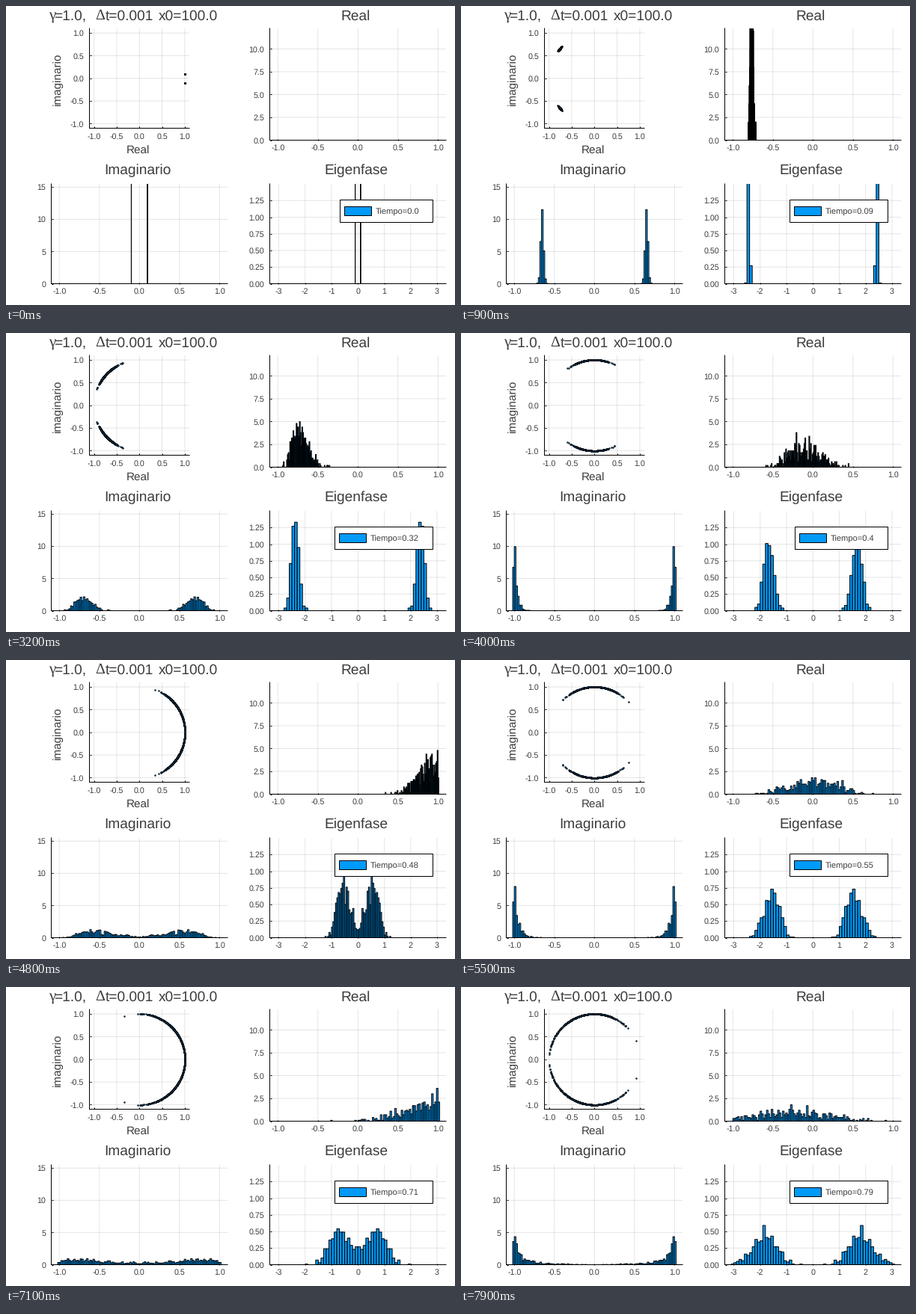
Recreate the animation shown at these times as a matplotlib script. Size 600 px wide and 400 px high, loop 8 s.

```python
import numpy as np
import matplotlib.pyplot as plt
from matplotlib.animation import FuncAnimation
from matplotlib.collections import PolyCollection
from matplotlib.patches import Rectangle

W, H, DPI = 600, 400, 100
PX = 72 / DPI  # points per pixel
BLUE, INK = "#009af9", "#3c3c3c"
FRAMES, STEPS = 80, 10
GAMMA, DT, X0 = 1.0, 0.001, 100.0
PAIRS, RADIUS = 500, 1.0035

plt.rcParams.update({
    "font.family": "Liberation Sans",
    "text.hinting": "none",
    "axes.linewidth": PX,
    "axes.axisbelow": True,
})


def simulate():
    """Damped noisy motion; the accumulated path is the eigenphase."""
    rng = np.random.default_rng(12)
    x = np.full(PAIRS, X0)
    phase = np.zeros(PAIRS)
    rows = []
    for step in range(FRAMES * STEPS):
        phase = phase + np.arcsin(x * DT)
        if step % STEPS == 0:
            rows.append(phase)
        x = x - GAMMA * x * DT + np.sqrt(2 * DT) * rng.normal(size=PAIRS)
    return rows


def bin_width(span, bins):
    raw = span / bins
    base = 10.0 ** np.floor(np.log10(raw))
    ratio = raw / base
    for limit, nice in ((1.1, 1), (2.2, 2), (5.5, 5)):
        if ratio <= limit:
            return nice * base
    return 10 * base


def bars(values, bins):
    lo, hi = values.min(), values.max()
    if hi - lo < 1e-9:
        return []
    w = bin_width(hi - lo, bins)
    first, last = np.floor(lo / w), np.floor(hi / w)
    edges = np.arange(first, last + 2) * w
    counts, _ = np.histogram(values, edges)
    heights = counts / (len(values) * w)
    return [[(a, 0), (a, h), (a + w, h), (a + w, 0)]
            for a, h in zip(edges, heights) if h > 0]


fig = plt.figure(figsize=(W / DPI, H / DPI), dpi=DPI, facecolor="white")

# Overlay in pixel coordinates, y downwards
stage = fig.add_axes([0, 0, 1, 1], zorder=5)
stage.set(xlim=(0, W), ylim=(H, 0))
stage.axis("off")


def label(x, y, text, size, ha="center", va="baseline", **kw):
    kw.setdefault("color", INK)
    return stage.text(x, y, text, fontsize=size * PX, ha=ha, va=va, **kw)


def box(x, y, w, h, fill):
    return stage.add_patch(Rectangle((x, y), w, h, fc=fill, ec="black",
                                     lw=PX, snap=False))


def panel(rect, xlim, ylim, xticks, yticks, xfmt, yfmt, xbase):
    left, top, right, bottom = rect
    ax = fig.add_axes([left / W, 1 - bottom / H,
                       (right - left) / W, (bottom - top) / H])
    ax.set(xlim=xlim, ylim=ylim, xticks=xticks, yticks=yticks)
    ax.spines[["top", "right"]].set_visible(False)
    for side in ("left", "bottom"):
        ax.spines[side].set_snap(False)
    ax.grid(color="black", alpha=0.1, lw=PX, snap=False)
    ax.tick_params(direction="in", length=2 * PX, width=PX,
                   labelbottom=False, labelleft=False)
    for v in xticks:
        x = left + (v - xlim[0]) / (xlim[1] - xlim[0]) * (right - left)
        label(x, xbase, format(v, xfmt), 10.6)
    for v in yticks:
        y = bottom - (v - ylim[0]) / (ylim[1] - ylim[0]) * (bottom - top)
        label(left - 7.2, y + 4, format(v, yfmt), 10.6, ha="right")
    return ax


def histogram(ax):
    coll = PolyCollection([], facecolors=BLUE, edgecolors="black",
                          linewidths=PX, snap=False)
    ax.add_collection(coll, autolim=False)
    return coll


unit = (-1.1, 1.1)
halves = [-1.0, -0.5, 0.0, 0.5, 1.0]

plane = panel((111.5, 30, 245, 163.5), unit, unit,
              halves, halves, ".1f", ".1f", 177.7)
real = histogram(panel((352.5, 30, 588, 179.5), unit, (0, 12.25), halves,
                       [0, 2.5, 5, 7.5, 10], ".1f", ".1f", 192.8))
imag = histogram(panel((60.5, 238, 296, 371.5), unit, (0, 15.5), halves,
                       [0, 5, 10, 15], ".1f", ".0f", 384.8))
angle = histogram(panel((352.5, 238, 588, 371.5), (-3.34, 3.34), (0, 1.5),
                        range(-3, 4), [0, 0.25, 0.5, 0.75, 1, 1.25],
                        "d", ".2f", 384.8))

dots, = plane.plot([], [], "o", ms=1.6 * PX, mfc=BLUE, mec="black",
                   mew=0.8 * PX)

# Titles and axis labels
TITLE = 19.2
label(57.5, 18.4, "γ", 21, ha="left", family="Liberation Serif")
label(64.5, 18.4, "=1.0,", TITLE, ha="left")
label(119.5, 18.4, "Δ", TITLE + 1, ha="left", family="Liberation Serif")
label(132.5, 18.4, "t=0.001", TITLE, ha="left")
label(204, 18.4, "x0=100.0", TITLE, ha="left")
label(467.5, 18.4, "Real", TITLE)
label(175.5, 225.5, "Imaginario", TITLE)
label(467.5, 225.5, "Eigenfase", TITLE)
label(176.5, 198, "Real", 15.2)
label(72.5, 98, "imaginario", 15.2, rotation=90, rotation_mode="anchor")

# Legend, anchored at its right edge
LEGEND_RIGHT = 570.5
frame_box = box(439.5, 259.5, 131, 30, "white")
swatch = box(445.5, 268.5, 36, 12, BLUE)
clock = label(487, 279.2, "", 11.1, ha="left")

phases = simulate()


def draw(i):
    z = RADIUS * np.exp(1j * phases[i])
    z = np.concatenate([z, z.conj()])
    dots.set_data(z.real, z.imag)
    real.set_verts(bars(z.real, 100))
    imag.set_verts(bars(z.imag, 100))
    angle.set_verts(bars(np.angle(z), 65))

    time = str(round(i * STEPS * DT, 2))
    left = 439.5 + 7 * (4 - len(time))
    frame_box.set_x(left)
    frame_box.set_width(LEGEND_RIGHT - left)
    swatch.set_x(left + 6)
    clock.set_x(left + 47.5)
    clock.set_text("Tiempo=" + time)
    return dots, real, imag, angle, frame_box, swatch, clock


anim = FuncAnimation(fig, draw, frames=FRAMES, interval=100,
                     repeat=True, repeat_delay=0, blit=False)
plt.show()
```
